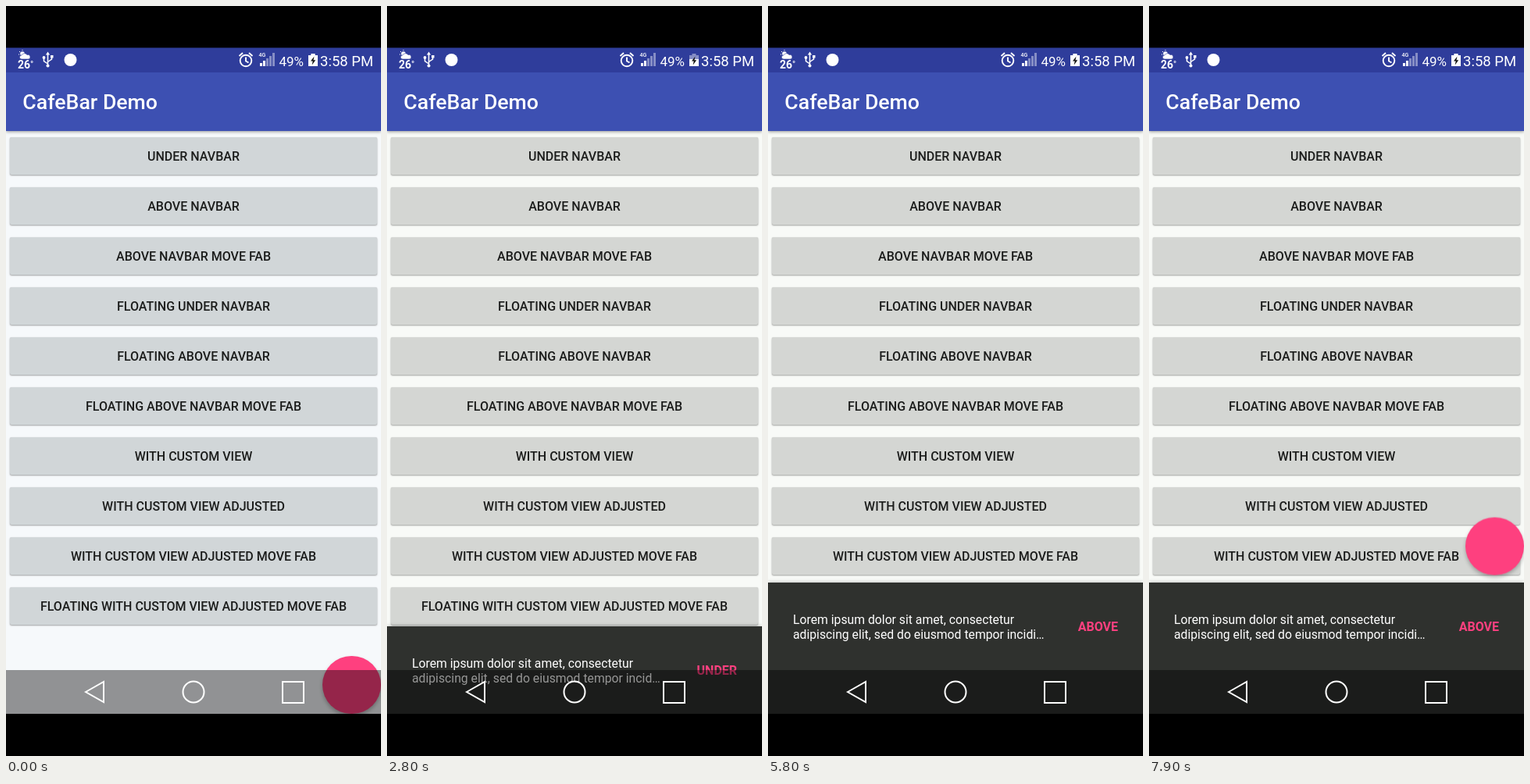
Write an HTML page that moves like this. It is 480 px wide and 960 px high and loops after 8 s.

```html
<!DOCTYPE html>
<html lang="en">
<head>
<meta charset="utf-8">
<title>CafeBar Demo</title>
<style>
  html, body { margin: 0; width: 100%; height: 100%; overflow: hidden; background: #000; }
  #stage {
    --page: #f8faf7; --key: #d4d6d3;
    position: relative; width: 480px; height: 960px; overflow: hidden;
    font-family: Roboto, "Liberation Sans", sans-serif;
  }
  #stage.cool { --page: #f6f9fb; --key: #d1d6d8; }
  #stage * { box-sizing: border-box; }
  #screen { position: absolute; top: 53px; width: 480px; height: 853px; overflow: hidden; background: var(--page); }
  #screen > * { position: absolute; }

  header {
    top: 0; width: 480px; height: 107px; padding: 32px 0 0 21.33px;
    background: linear-gradient(#1a2255 1px, #2f3d9b 1px 32px, #3d50b2 32px);
    box-shadow: 0 1px 4px rgba(0, 0, 0, .4);
    color: #fff; font: 500 26.67px/77px Roboto, "Liberation Sans", sans-serif;
  }

  .key {
    left: 5.33px; width: 469.33px; height: 48px; border-radius: 2px;
    overflow: hidden; isolation: isolate;
    background: var(--key); box-shadow: 0 1px 2px rgba(0, 0, 0, .34), 0 0 1px rgba(0, 0, 0, .15);
    color: #1b1c1b; font-weight: 500; font-size: 16px; line-height: 49px; text-align: center;
  }
  .key span { position: relative; z-index: 1; }
  .tapped { animation: press 800ms var(--at); }
  .tapped::after {
    content: ""; position: absolute; left: -45px; top: -256px; width: 560px; height: 560px;
    border-radius: 50%; background: #c7c9c6; opacity: 0;
    animation: ripple 800ms var(--at);
  }

  #fab {
    left: 405.33px; top: 778.67px; width: 74.67px; height: 74.67px; border-radius: 50%;
    background: #fe407f; box-shadow: 0 3px 5px rgba(0, 0, 0, .26);
    animation: lift 300ms 7550ms cubic-bezier(.4, 0, .2, 1) both;
  }

  .bar {
    bottom: 0; width: 480px; height: 112px; background: #2f312e;
    box-shadow: 0 0 5px rgba(0, 0, 0, .3);
    color: #fff; font-size: 15.75px; line-height: 18.5px; white-space: pre;
    animation-timing-function: cubic-bezier(.4, 0, .2, 1);
    animation-duration: 250ms;
  }
  .bar p { position: absolute; left: 32px; top: 39px; margin: 0; }
  .bar b { position: absolute; right: 32px; top: 48px; font-size: 16px; color: #fe407f; }
  #under {
    animation-name: rise, drop; animation-delay: 1775ms, 4050ms;
    animation-fill-mode: both, forwards;
  }
  #above {
    height: 168px;
    animation-name: rise, drop, rise; animation-delay: 4567ms, 6842ms, 7367ms;
    animation-fill-mode: both, forwards, forwards;
  }

  #nav { bottom: 0; width: 480px; height: 56px; background: rgba(0, 0, 0, .41); }
  #icons { position: absolute; left: 0; top: 0; }

  @keyframes rise {
    from { transform: translateY(100%); visibility: hidden; }
    to { transform: none; visibility: visible; }
  }
  @keyframes drop {
    from { transform: none; visibility: visible; }
    to { transform: translateY(100%); visibility: hidden; }
  }
  @keyframes lift { from { transform: none; } to { transform: translateY(-177.5px); } }
  @keyframes press {
    0% { background: #d0d2cf; box-shadow: 0 2px 6px rgba(0, 0, 0, .4); }
    25% { background: #d0d2cf; box-shadow: 0 1px 2px rgba(0, 0, 0, .34); }
  }
  @keyframes ripple {
    0% { transform: translate(177px, 5px) scale(.036); opacity: 1; }
    25% { transform: translate(138px, 0) scale(.243); opacity: 1; }
    50% { transform: translate(85px, 0) scale(.55); opacity: .3; }
    75%, 100% { transform: none; opacity: 0; }
  }
</style>
</head>
<body>
<div id="stage">
  <div id="screen">
    <header>CafeBar Demo</header>
    <div id="fab"></div>
    <div class="bar" id="under"><p>Lorem ipsum dolor sit amet, consectetur
adipiscing elit, sed do eiusmod tempor incid…</p><b>UNDER</b></div>
    <div class="bar" id="above"><p>Lorem ipsum dolor sit amet, consectetur
adipiscing elit, sed do eiusmod tempor incidi…</p><b>ABOVE</b></div>
    <div id="nav"></div>
  </div>

  <svg id="icons" width="480" height="960" fill="#fff">
    <!-- weather -->
    <circle cx="21" cy="61" r="2.8"/>
    <path d="M17 58l1 1M21 56v1M16 62h1" stroke="#fff"/>
    <path d="M20 68a2.5 2.5 0 0 1 0-5a4 4 0 0 1 7-.5a2.8 2.8 0 0 1 2 5.5z" stroke="#2f3d9b" stroke-width=".6"/>
    <text x="15" y="80" font-size="14" font-weight="700">26<tspan font-size="11" dy="-2">°</tspan></text>
    <!-- cable and debugging -->
    <path d="M53.5 62v14M53.5 74l-5-3.5v-4M53.5 71.5l5-3.5v-3" fill="none" stroke="#fff" stroke-width="1.5"/>
    <path d="M53.5 58.5l2.6 4h-5.2zM57 63h3.5v3.5h-3.5z"/>
    <circle cx="53.5" cy="76.5" r="2"/>
    <circle cx="48.5" cy="66" r="1.9"/>
    <circle cx="82.5" cy="69" r="8"/>
    <!-- alarm -->
    <g fill="none" stroke="#fff" stroke-width="1.9">
      <circle cx="307" cy="70" r="7.3"/>
      <path d="M307 65.5v5l3.5 2M298.5 64l4.5-4M315.5 64l-4.5-4"/>
    </g>
    <!-- signal -->
    <text x="323.5" y="65" font-size="7" font-weight="500">4G</text>
    <path d="M325 73h3v4h-3zM329 70h3v7h-3z"/>
    <path d="M333 67h3v10h-3zM337 64h3v13h-3zM341 60h3v17h-3z" opacity=".42"/>
    <text x="349.5" y="76.5" font-size="17">49%</text>
    <!-- battery -->
    <clipPath id="cell"><path d="M390.5 61h5v2h3.5v14h-12v-14h3.5z"/></clipPath>
    <g clip-path="url(#cell)">
      <rect x="387" y="61" width="12" height="16" opacity=".42"/>
      <rect id="charge" x="387" y="61" width="12" height="16"/>
    </g>
    <path d="M394.5 64.5l-4.5 6h2.7l-1 5l4.5-6.2h-2.7z" fill="#111"/>
    <text x="402" y="76.5" font-size="18.5">3:58 PM</text>
    <!-- navigation -->
    <g fill="none" stroke="#fff" stroke-width="2">
      <path d="M102 878l23-13v26zM354 865h27v27h-27z"/>
      <circle cx="240" cy="878" r="13.5"/>
    </g>
  </svg>
</div>
<script>
  const LOOP = 8000, STEP = 100;
  const labels = [
    'UNDER NAVBAR', 'ABOVE NAVBAR', 'ABOVE NAVBAR MOVE FAB',
    'FLOATING UNDER NAVBAR', 'FLOATING ABOVE NAVBAR', 'FLOATING ABOVE NAVBAR MOVE FAB',
    'WITH CUSTOM VIEW', 'WITH CUSTOM VIEW ADJUSTED', 'WITH CUSTOM VIEW ADJUSTED MOVE FAB',
    'FLOATING WITH CUSTOM VIEW ADJUSTED MOVE FAB'
  ];
  const taps = [1600, 4500, 7300];
  const chargeLevels = '33012012301230123';
  const chargeTops = [70, 68, 65, 61];

  const stage = document.getElementById('stage');
  const screenBox = document.getElementById('screen');
  const charge = document.getElementById('charge');
  const fab = document.getElementById('fab');

  labels.forEach((label, i) => {
    const key = document.createElement('div');
    key.className = 'key';
    key.style.top = 115 + 64 * i + 'px';
    key.innerHTML = `<span>${label}</span>`;
    if (i in taps) {
      key.classList.add('tapped');
      key.style.setProperty('--at', taps[i] + 'ms');
    }
    screenBox.insertBefore(key, fab);
  });

  const motions = document.getAnimations();
  motions.forEach(m => m.pause());

  function draw() {
    const t = Math.floor((performance.now() + 16) / STEP) * STEP % LOOP;
    motions.forEach(m => { m.currentTime = t; });
    charge.setAttribute('y', chargeTops[chargeLevels[Math.floor((t + 200) / 500)]]);
    stage.classList.toggle('cool', t < 1300);
    requestAnimationFrame(draw);
  }
  draw();
</script>
</body>
</html>
```
